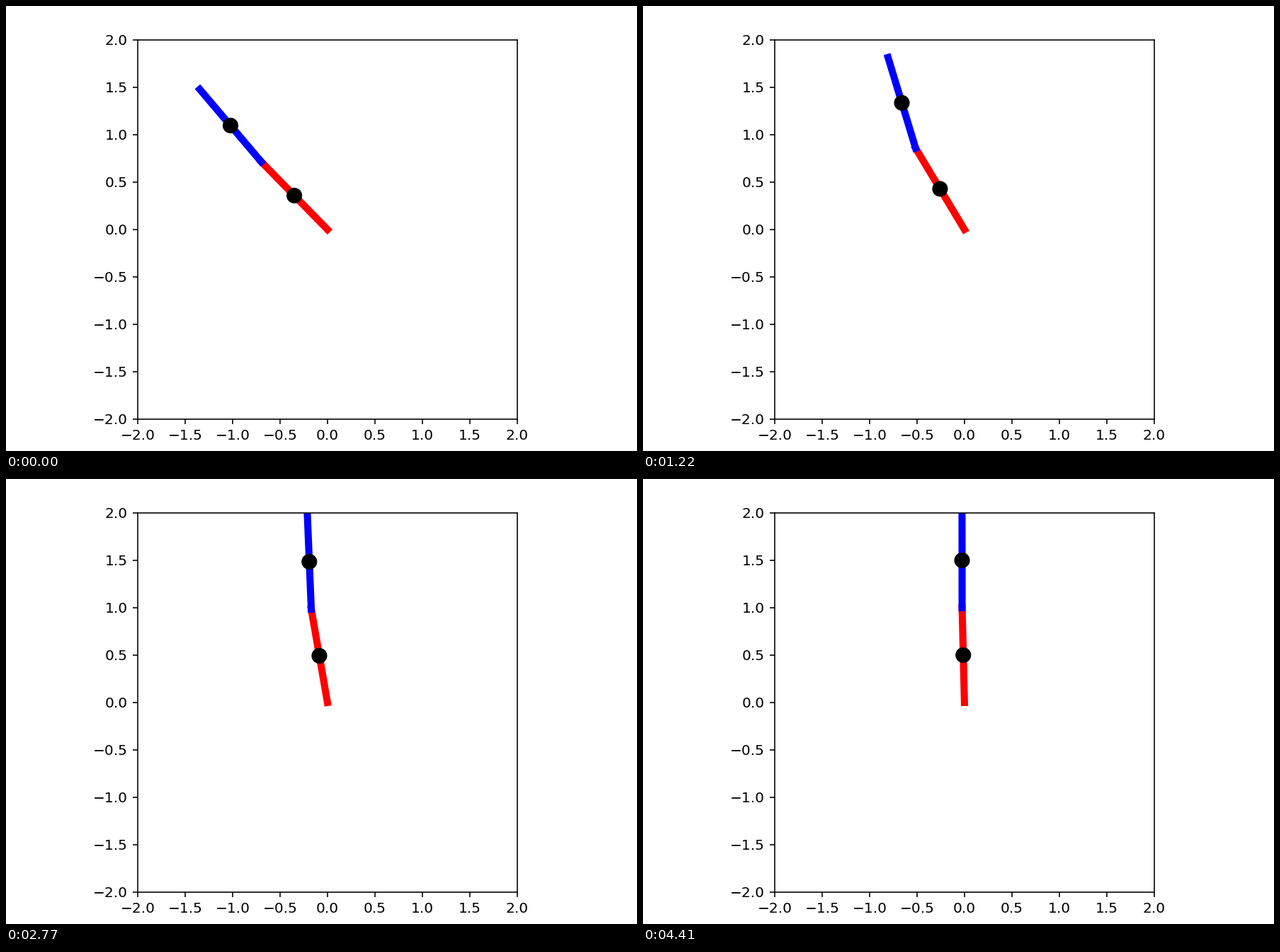
Recreate the animation shown at these times as a matplotlib script. Size 891 px wide and 629 px high, loop 4530 ms.

```python
import numpy as np
import matplotlib.pyplot as plt
from matplotlib.animation import FuncAnimation
from matplotlib.patches import Circle

W, H, DPI = 891, 629, 144
LOOP, DT = 4530, 15
S = 1.0076  # slight enlargement of the default point sizes

# The arm moves in regular bursts of small steps, with a short rest after each
START, PERIOD, MOVE = 100, 551, 460
STEPS, BURSTS = 17, 8


def progress(t):
    """Number of bursts done at time t (ms), in whole steps."""
    if t < START:
        return 0
    burst, rest = divmod(t - START, PERIOD)
    step = min(rest * (STEPS - 1) // MOVE + 1, STEPS)
    return min(burst + step / STEPS, BURSTS)


def lower_angle(s):
    return 44.3 * np.exp(-0.085 * s - 0.0432 * s ** 2)


def upper_angle(s):
    return 40.3 * np.exp(-0.393 * s - 0.007 * s ** 3)


def direction(deg):
    """Unit vector leaning left of vertical."""
    a = np.radians(deg)
    return np.array([-np.sin(a), np.cos(a)])


fig = plt.figure(figsize=(W / DPI, H / DPI), dpi=DPI, facecolor="white")
ax = fig.add_axes([185.9 / W, 1 - 583.9 / H, 536 / W, 536 / H])
ax.set(xlim=(-2, 2), ylim=(-2, 2))
ticks = np.arange(-2, 2.1, 0.5)
ax.set_xticks(ticks)
ax.set_yticks(ticks)
ax.tick_params(labelsize=10 * S, length=3.5 * S, width=0.8 * S, pad=3.5 * S)
for spine in ax.spines.values():
    spine.set_linewidth(0.8 * S)

links = [ax.plot([], [], color=c, lw=5 * S)[0] for c in ("red", "blue")]
masses = [ax.add_patch(Circle((0, 0), 0.0825, color="black", lw=0, zorder=3))
          for _ in links]


def update(i):
    s = progress((i + 1) * DT - 1)
    base = np.zeros(2)
    joint = base + direction(lower_angle(s))
    tip = joint + direction(upper_angle(s))
    for link, mass, p, q in zip(links, masses, (base, joint), (joint, tip)):
        link.set_data(*zip(p, q))
        mass.center = (p + q) / 2
    return links + masses


anim = FuncAnimation(fig, update, frames=LOOP // DT, interval=DT,
                     repeat=True, repeat_delay=0, blit=False)
plt.show()
```
